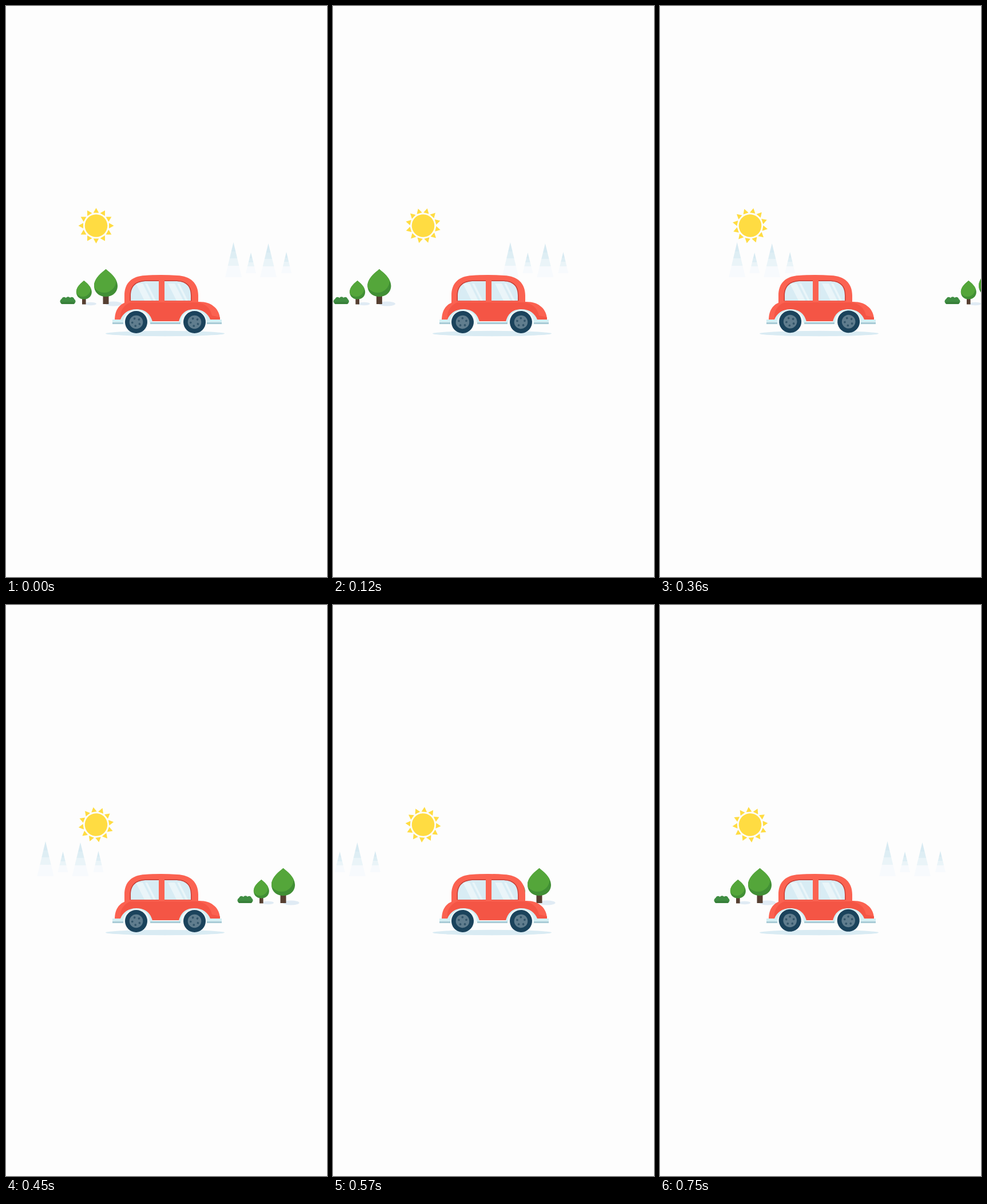
Recreate the animation shown at these times as an HTML page. Size 561x998 px, loop 0.78 s.

```html
<!DOCTYPE html>
<html lang="en">
<head>
<meta charset="utf-8">
<title>Red car</title>
<style>
  html, body { margin: 0; height: 100%; overflow: hidden; background: #fdfdfd; }
  svg { display: block; width: 100%; height: 100%; }
</style>
</head>
<body>
<svg viewBox="0 0 561 998">
  <defs>
    <linearGradient id="snow" x2="0" y2="1">
      <stop offset=".27" stop-color="#d7eaf2"/><stop offset=".27" stop-color="#deeef4"/>
      <stop offset=".46" stop-color="#deeef4"/><stop offset=".46" stop-color="#eaf4f8"/>
      <stop offset=".68" stop-color="#eaf4f8"/><stop offset=".68" stop-color="#f7fafd"/>
    </linearGradient>
    <clipPath id="crown">
      <path id="leaf" d="M0 0C6 5 20.5 15.5 20.5 29C20.5 41 11 48 0 48S-20.5 41-20.5 29C-20.5 15.5-6 5 0 0Z"/>
    </clipPath>
    <g id="tree">
      <path d="M-5 44H5V61H-5Z" fill="#563f31"/>
      <use href="#leaf" fill="#418f35"/>
      <ellipse cx="-3" cy="20" rx="21" ry="21" fill="#54a63a" clip-path="url(#crown)"/>
    </g>
    <clipPath id="glass">
      <path d="M218 515V507C218 490 227 481 247 481H267V515ZM277 515V481H295C314 481 323 489 323 506V515Z"/>
    </clipPath>
    <g id="wheel">
      <circle r="19.5" fill="#1b435c"/>
      <circle r="11.8" fill="#607d8e"/>
    </g>
  </defs>

  <g id="sun" fill="#ffdc42"><circle r="19.8"/></g>
  <g id="pines" fill="url(#snow)">
    <path d="M397.5 413L412 474H383Z"/>
    <path d="M428 431L437 467H419Z"/>
    <path d="M458.5 415L473 474H444Z"/>
    <path d="M490 430L499 467H481Z"/>
  </g>
  <g id="trees">
    <g fill="#e0ebf4">
      <ellipse cx="188" cy="520.5" rx="14.5" ry="4"/>
      <ellipse cx="148" cy="520.5" rx="10" ry="2.7"/>
    </g>
    <use href="#tree" x="174.5" y="460"/>
    <use href="#tree" transform="translate(136.3 480) scale(.66 .68)"/>
    <g fill="#3f8d42">
      <rect x="94.5" y="511.5" width="27" height="9.5" rx="4.7"/>
      <circle cx="101.5" cy="513" r="4.3"/><circle cx="108.5" cy="512.5" r="4.3"/><circle cx="115" cy="513" r="4.3"/>
    </g>
    <rect x="96" y="517" width="24" height="4" rx="2" fill="#38803a"/>
  </g>

  <ellipse cx="278" cy="572.5" rx="104" ry="4.7" fill="#d9ebf3"/>
  <path d="M207 522V506C207 484 220 472 243 471Q271 469 299 471C323 472 336 485 336 506V522Z" fill="#fb6251"/>
  <path d="M190 549C190 534 196 521 212 517H338C360 517 374 530 374 549L305 551H252Z" fill="#fb6251"/>
  <path d="M200 549C198 533 206 522 218 518H334C349 520 357 528 360 541L374 544V549L305 551H252Z" fill="#f45545"/>
  <path d="M216.5 515.5V507C216.5 489 226 479.5 247 479.5H267V515.5ZM277 515.5V479.5H295C315 479.5 324.5 488 324.5 506V515.5Z" fill="#c93f36"/>
  <g clip-path="url(#glass)">
    <path d="M210 475H330V520H210Z" fill="#d8ecf4"/>
    <path d="M227 485H239L254 515H242ZM243 485H247L262 515H258ZM283 485H295L310 515H298ZM299 485H303L318 515H314Z" fill="#fff" opacity=".45"/>
  </g>
  <path d="M186 548H200C204 538 213 530 228 530C244 530 253 539 256 552H302C305 539 313 530 329 530C344 530 353 538 357 548H377V553H186Z" fill="#d3eff4"/>
  <path d="M256 545H302V551H256Z" fill="#f45545"/>
  <path d="M186 553H209V556H186ZM252 553H305V556H252ZM349 553H377V556H349Z" fill="#a9cbd6"/>
  <path d="M205 557V552A22 20 0 0 1 251 552V557ZM306 557V552A22 20 0 0 1 351 552V557Z" fill="#f1fafc"/>
  <use href="#wheel" class="wheel"/>
  <use href="#wheel" class="wheel"/>
</svg>
<script>
  const STEP = 30, STEPS = 26;
  const byId = id => document.getElementById(id);
  const wheels = document.querySelectorAll('.wheel');

  function add(parent, tag, attrs) {
    const el = document.createElementNS('http://www.w3.org/2000/svg', tag);
    for (const key in attrs) el.setAttribute(key, attrs[key]);
    parent.append(el);
  }
  const place = (el, x, y = 0, turn = 0) =>
    el.setAttribute('transform', `translate(${x} ${y}) rotate(${turn})`);

  for (let i = 0; i < 12; i++)
    add(byId('sun'), 'path', { d: 'M0-31L4.8-22.5H-4.8Z', transform: `rotate(${i * 30})` });
  for (let i = 0; i < 5; i++)
    add(byId('wheel'), 'circle', { cy: -6.8, r: 1.9, fill: '#34566b', transform: `rotate(${i * 72 - 25})` });

  function draw(now) {
    const n = Math.floor(now / STEP) % STEPS;
    place(byId('sun'), 157.5, 384, n * 3.4);
    place(byId('pines'), n < 25 ? -21.9 * n : 0);
    place(byId('trees'), n < 10 ? -23.4 * n : 31 * (25 - n));

    // The wheels run slightly off centre
    const turn = n * 24, a = (turn + 45) * Math.PI / 180;
    wheels.forEach((wheel, i) =>
      place(wheel, 227 + i * 102 + 0.7 * Math.cos(a), 552 + 0.7 * Math.sin(a), turn));
    requestAnimationFrame(draw);
  }
  requestAnimationFrame(draw);
</script>
</body>
</html>
```
